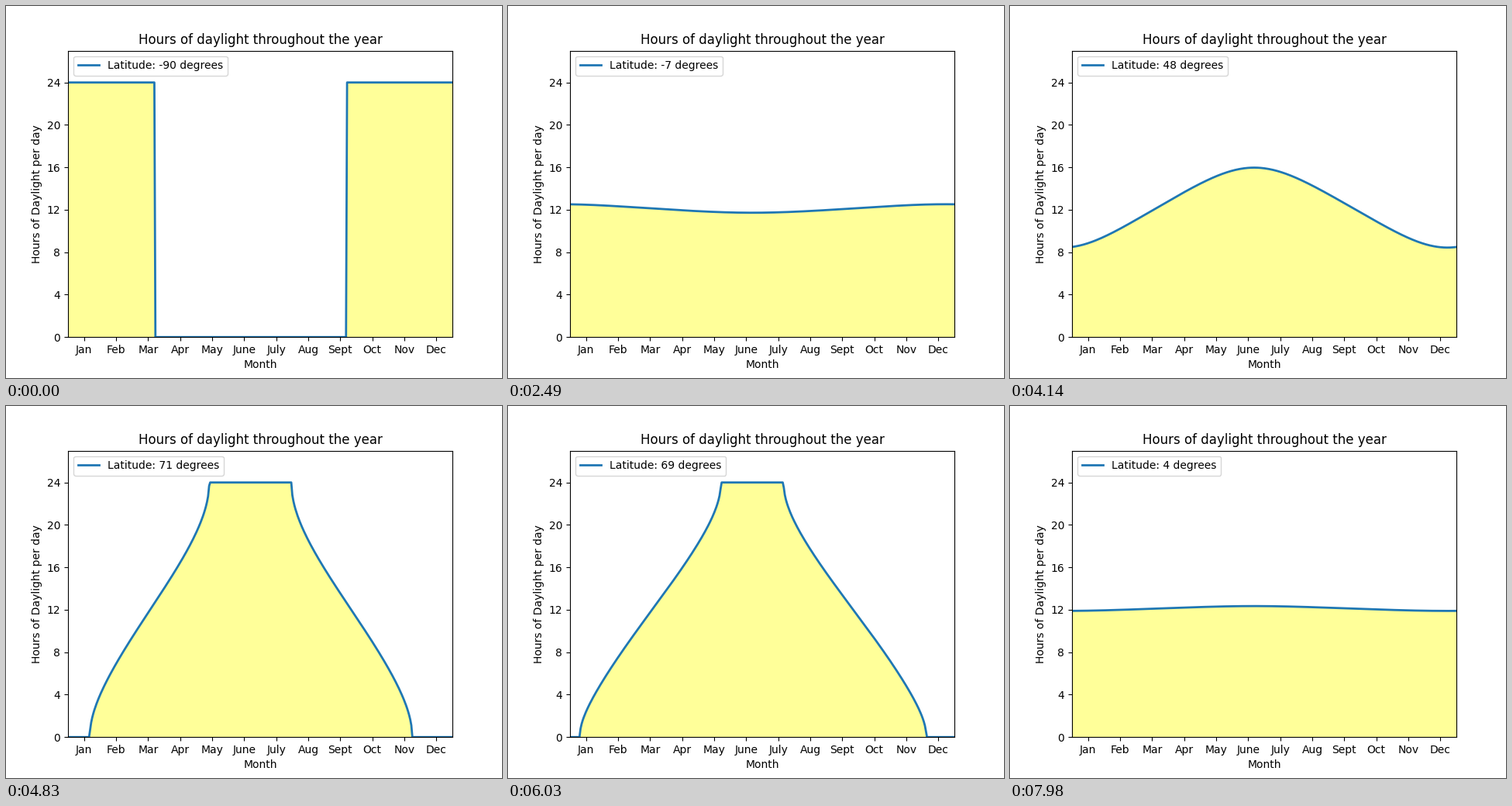
A matplotlib script for the animation above (8 s loop, 640 px wide and 480 px high).

```python
import numpy as np
import matplotlib.pyplot as plt
from matplotlib.animation import FuncAnimation

LOOP_MS = 8000
FRAMES = 267
MONTHS = "Jan Feb Mar Apr May June July Aug Sept Oct Nov Dec".split()

days = np.arange(366)
angle = 0.2163108 + 2 * np.arctan(0.9671396 * np.tan(0.0086 * (days - 186)))
declination = np.arcsin(0.392 * np.cos(angle))
horizon = np.sin(np.radians(0.8333))


def daylight(lat):
    """Hours between sunrise and sunset for every day of the year."""
    phi = np.radians(lat)
    ratio = (horizon + np.sin(phi) * np.sin(declination)) / (
        np.cos(phi) * np.cos(declination))
    return 24 - 24 / np.pi * np.arccos(np.clip(ratio, -1, 1))


def latitude(i):
    """One degree per frame, south pole to north pole and back."""
    return 90 - abs(180 - i)


plt.rcParams["font.family"] = "DejaVu Sans"
fig, ax = plt.subplots(figsize=(6.4, 4.8), dpi=100)
ax.set_xlim(0, 365)
ax.set_ylim(0, 27)
ax.set_xticks((np.arange(12) + 0.5) * 365 / 12, MONTHS)
ax.set_yticks(range(0, 25, 4))
ax.set_title("Hours of daylight throughout the year")
ax.set_xlabel("Month")
ax.set_ylabel("Hours of Daylight per day")

line, = ax.plot(days, daylight(-90), color="tab:blue", lw=2, label="Latitude")
area, = ax.fill(days, 0 * days, facecolor="yellow", alpha=0.4, lw=0)
legend = ax.legend(handles=[line], loc="upper left")
caption = legend.get_texts()[0]


def update(i):
    lat = latitude(i)
    hours = daylight(lat)
    line.set_ydata(hours)
    area.set_xy(np.column_stack([np.r_[0, days, 365], np.r_[0, hours, 0]]))
    caption.set_text(f"Latitude: {lat} degrees")
    return line, area, legend


anim = FuncAnimation(fig, update, frames=FRAMES, interval=LOOP_MS / FRAMES,
                     init_func=lambda: update(0), repeat=True, repeat_delay=0)
plt.show()
```
